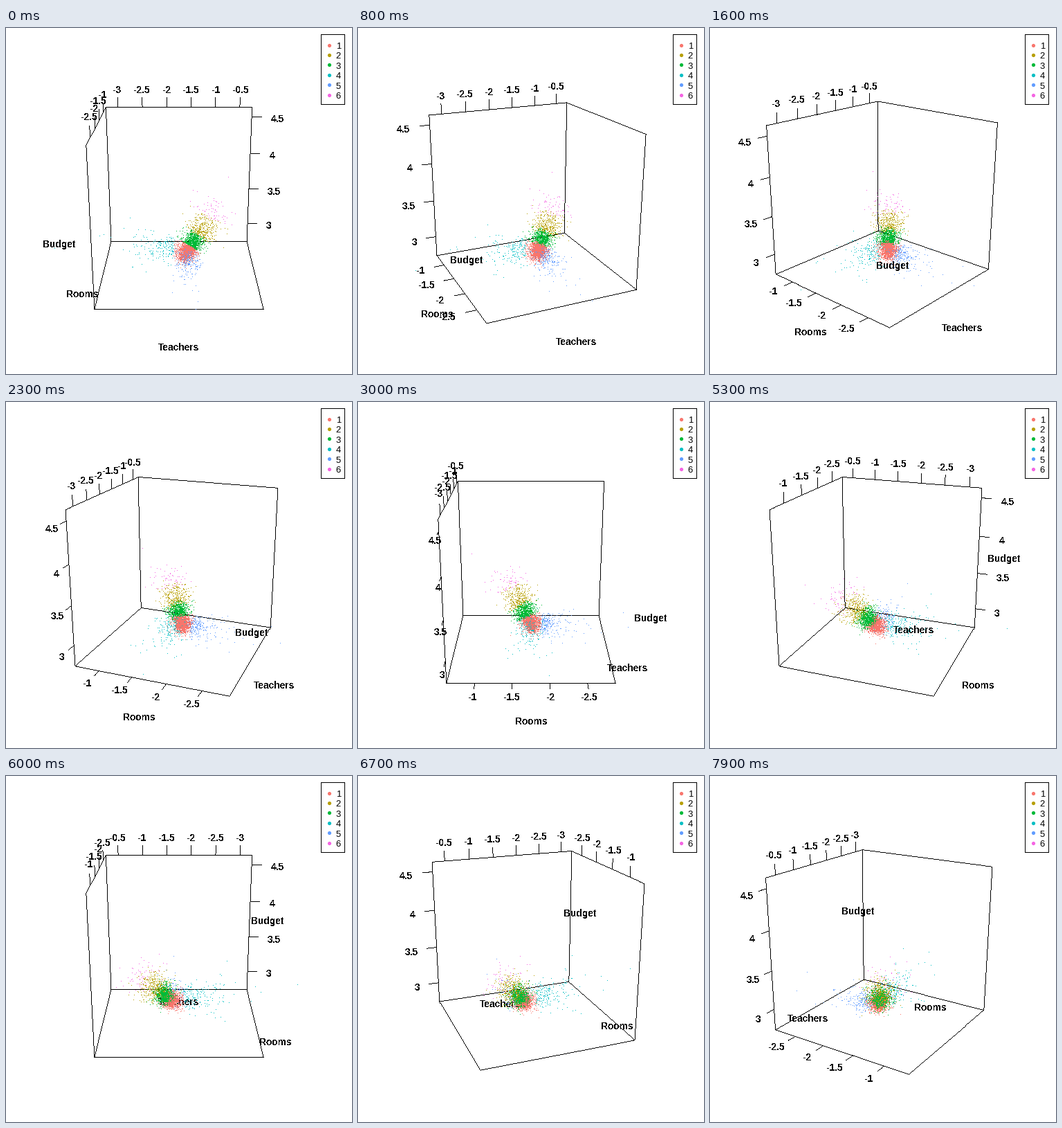
These frames come from a looping animation (500x500 px, 8000 ms). A matplotlib script:

```python
import numpy as np
import matplotlib.pyplot as plt
from matplotlib.animation import FuncAnimation
from matplotlib.colors import to_rgb

SIZE, FRAMES, STEP = 500, 80, 3          # pixels, frames, degrees per frame
PX = 0.72                                # points per pixel at 100 dpi
FOCAL, DIST = 933, 8.235
COS_P, SIN_P = np.cos(np.radians(20)), np.sin(np.radians(20))
MARK = 2 / 15                            # tick length
DROP = 7.6                               # baseline below a label's anchor
COLORS = ["#F8766D", "#B79F00", "#00BA38", "#00BFC4", "#619CFF", "#F564E3"]

CORE = np.array([0.11, -0.715, -0.01])   # densest spot of the cloud
TREND = np.array([0.1, 0.13, -0.08])     # the cloud thins out along this way
TEAL_WAY = np.array([-1, 0.15, 0])
BLUE_WAY = np.array([0, -0.08, 1])


def project(points, angle):
    """Turn points about the vertical axis; return screen x, y and depth."""
    x, y, z = np.asarray(points, float).T
    c, s = np.cos(angle), np.sin(angle)
    x, z = x * c + z * s, z * c - x * s
    depth = z * COS_P + y * SIN_P
    w = FOCAL / (DIST - depth)
    return SIZE / 2 + w * x, SIZE / 2 - w * (y * COS_P - z * SIN_P), depth


def make_cloud():
    """A widening trail with two side branches, coloured by nearest centre."""
    rng = np.random.default_rng(4)

    def trail(reach, way, base, growth):
        spread = base + growth * np.maximum(reach, 0)
        noise = rng.normal(size=(len(reach), 3)) * spread[:, None]
        return CORE + np.outer(reach, way) + noise

    pts = np.vstack([
        trail(rng.lognormal(0.62, 0.42, 2300) - 1.3, TREND, 0.042, 0.028),
        trail(rng.exponential(0.2, 400), TEAL_WAY, 0.06, 0.12),
        trail(rng.exponential(0.14, 550), BLUE_WAY, 0.05, 0.1),
    ])
    pts[:, 1] = np.maximum(pts[:, 1], -0.98)
    centers = np.array([CORE, CORE + 2 * TREND, CORE + 0.9 * TREND,
                        CORE + 0.36 * TEAL_WAY, CORE + 0.29 * BLUE_WAY,
                        CORE + 4 * TREND])
    group = ((pts[:, None] - centers) ** 2).sum(2).argmin(1)
    return pts, np.array([to_rgb(c) for c in COLORS])[group]


cloud, cloud_rgb = make_cloud()

fig = plt.figure(figsize=(5, 5), dpi=100, facecolor="white")
ax = fig.add_axes([0, 0, 1, 1])
ax.set(xlim=(0, SIZE), ylim=(SIZE, 0))
ax.axis("off")
canvas = ax.imshow(np.zeros((SIZE, SIZE, 4)), extent=(0, SIZE, SIZE, 0),
                   interpolation="nearest", aspect="auto", zorder=2)


def label(text, ha="left"):
    return ax.text(0, 0, text, ha=ha, va="baseline", color="black",
                   family="Liberation Sans", weight="bold", size=13.7 * PX,
                   antialiased=False, zorder=3)


titles = [(label("Teachers", "center"), (0, -1.3, 1.3)),
          (label("Rooms", "center"), (-1.3, -1.3, 0)),
          (label("Budget", "center"), (-1.3, 0, 1.3))]


def ticks(first, last, scale):
    marks = []
    for v in np.arange(first, last + 0.1, 0.5):
        text = label(f"{v:g}")
        marks.append((text, text.get_window_extent().width, scale(v)))
    return marks


x_ticks = ticks(-3, -0.5, lambda v: (v + 1.748) / 1.5)
y_ticks = ticks(3, 4.5, lambda v: (v - 3.675) * 1.053)
z_ticks = ticks(-2.5, -1, lambda v: -(v + 1.748) * 0.89)


def draw_legend():
    for i, color in enumerate(COLORS):
        y = 24.5 + 14.4 * i
        ax.plot(466.5, y, "o", color=color, ms=5.2 * PX, mew=0, zorder=5)
        ax.text(480.3, y + 5.5, str(i + 1), ha="center", va="baseline",
                family="Liberation Sans", size=13 * PX, color="black", zorder=5)


def box_edges(hx, hz):
    ring = [(-1, -1), (1, -1), (1, 1), (-1, 1)]
    edges = [((x0, -1, z0), (x1, -1, z1))
             for (x0, z0), (x1, z1) in zip(ring, ring[1:] + ring[:1])]
    edges += [((-1, 1, hz), (1, 1, hz)), ((hx, 1, -1), (hx, 1, 1))]
    edges += [((x, -1, z), (x, 1, z))
              for x, z in [(hx, hz), (-hx, hz), (hx, -hz)]]
    return edges


def place_tick(mark, base, way, angle):
    """Set the label beyond the tick and return the tick's two ends."""
    text, width, _ = mark
    base, way = np.array(base, float), np.array(way, float)
    sx, sy, _ = project([base + 2 * MARK * way], angle)
    # the label slides from right- to left-aligned as the tick swings round
    shift = (1 - way[0] * np.cos(angle)) / 2
    text.set_position((sx[0] - shift * width, sy[0] + DROP))
    return base, base + MARK * way


def plot_pixels(image, x, y, rgb):
    col = np.clip(np.floor(x).astype(int), 0, SIZE - 1)
    row = np.clip(np.floor(y).astype(int), 0, SIZE - 1)
    image[row, col, :3] = rgb
    image[row, col, 3] = 1


def plot_line(image, x0, y0, x1, y1):
    n = int(max(abs(x1 - x0), abs(y1 - y0))) + 2
    plot_pixels(image, np.linspace(x0, x1, n), np.linspace(y0, y1, n), 0)


def update(frame):
    angle = np.radians(frame * STEP)
    # the hidden walls only swap just after each quarter turn
    before = angle - 1e-4
    hx = 1 if np.sin(before) > 0 else -1
    hz = -1 if np.cos(before) > 0 else 1

    up, out = (0, 1, 0), (-hx, 0, 0)
    segments = box_edges(hx, hz)
    for mark in x_ticks:
        segments.append(place_tick(mark, (mark[2], 1, hz), up, angle))
    for mark in y_ticks:
        segments.append(place_tick(mark, (-hx, mark[2], hz), out, angle))
    # the depth axis takes whichever outline edge is nearer the viewer
    low = abs(np.sin(angle)) * COS_P > SIN_P
    for mark in z_ticks:
        base, way = ((-hx, -1, mark[2]), out) if low else ((hx, 1, mark[2]), up)
        segments.append(place_tick(mark, base, way, angle))

    image = np.zeros((SIZE, SIZE, 4))
    for ends in segments:
        (x0, x1), (y0, y1), _ = project(ends, angle)
        plot_line(image, x0, y0, x1, y1)
    image[9:111, [455, 489]] = image[[9, 110], 455:490] = (0, 0, 0, 1)

    sx, sy, depth = project(cloud, angle)
    order = np.argsort(depth)
    plot_pixels(image, sx[order], sy[order], cloud_rgb[order])
    canvas.set_data(image)

    for text, pos in titles:
        sx, sy, depth = project([pos], angle)
        text.set_position((sx[0], sy[0] + DROP))
        text.set_zorder(3 if depth[0] > 0 else 1)
    return []


draw_legend()
anim = FuncAnimation(fig, update, frames=FRAMES, interval=100,
                     init_func=lambda: update(0), repeat=True, repeat_delay=0)
plt.show()
```
